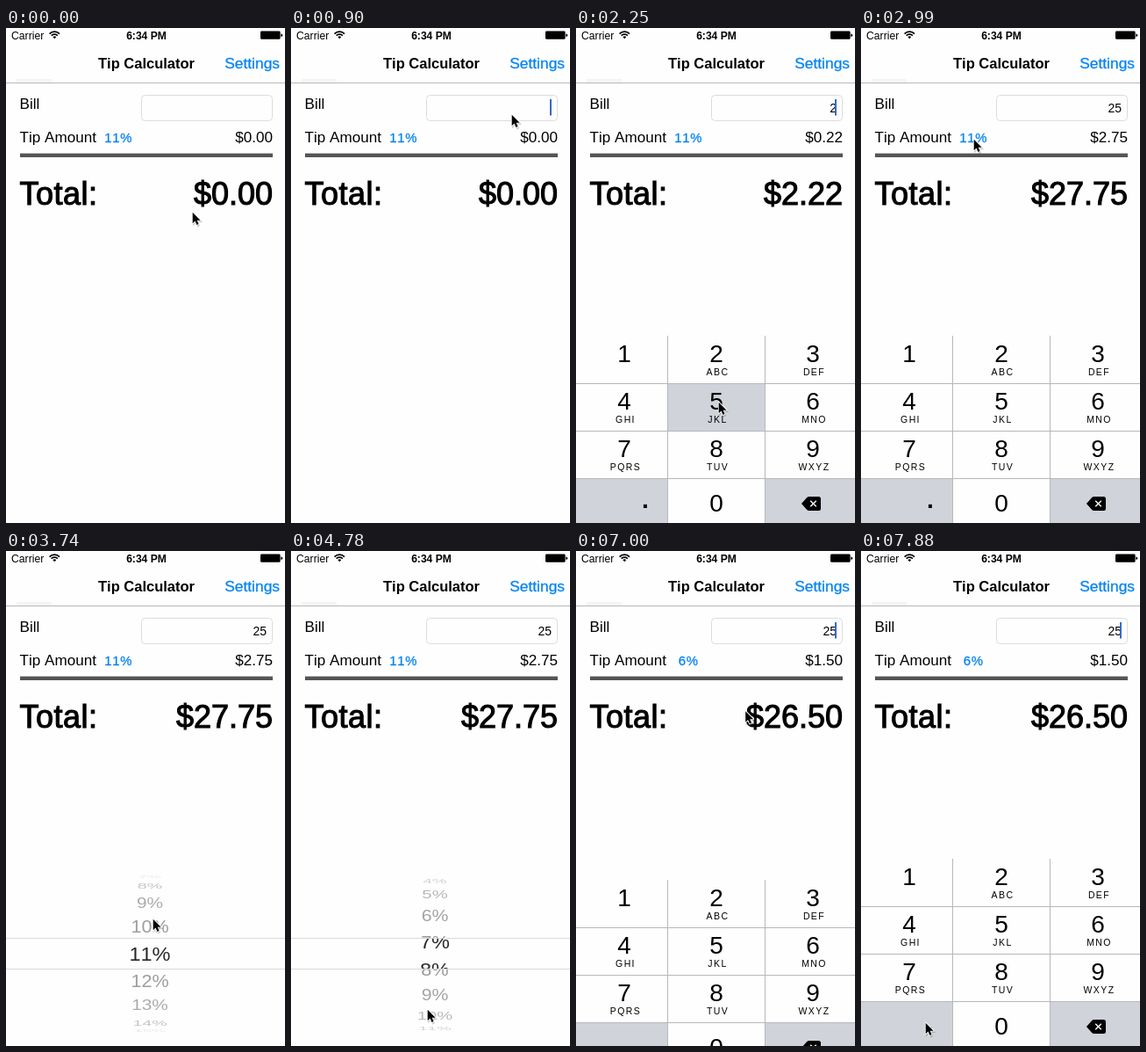
Animation of 318 by 563 pixels, one loop 8000 ms. Source, as an HTML page:

```html
<!DOCTYPE html>
<html lang="en">
<head>
<meta charset="utf-8">
<title>Tip Calculator</title>
<style>
  html, body { margin: 0; width: 100%; height: 100%; overflow: hidden; background: #fefefe; }
  svg { display: block; width: 100vw; height: 100vh; }
  text { font-family: "Liberation Sans", Arial, sans-serif; font-kerning: none; fill: #000; }
  .body { font-size: 17.1px; }
  .blue { fill: #0584f2; stroke: #0584f2; stroke-width: .3px; }
  .total { font-size: 36px; stroke: #000; stroke-width: 1.1px; }
  .bold { font-weight: bold; }
  .mid { text-anchor: middle; }
  .end { text-anchor: end; }
  .digit { font-size: 28px; }
  .abc { font-size: 10.5px; letter-spacing: 1.4px; }
  .row { font-size: 23.5px; }
</style>
</head>
<body>
<svg id="stage" viewBox="0 0 318 563" preserveAspectRatio="none">
  <defs>
    <clipPath id="lens"><rect x="0" y="441" width="318" height="34"/></clipPath>
    <clipPath id="rim"><path d="M0 340H318V440H0ZM0 476H318V563H0Z"/></clipPath>
    <path id="arrow" d="M0 0V14.6L3.3 11.5L5.6 16.7L8 15.6L5.8 10.5H10.4Z"/>
  </defs>
  <rect width="318" height="563" fill="#fefefe"/>

  <text x="6" y="12.5" font-size="12.2">Carrier</text>
  <g fill="none" stroke="#000" stroke-width="1.7">
    <path d="M49.6 6.6a8 8 0 0 1 11.4 0M51.7 8.7a5 5 0 0 1 7.2 0"/>
    <path d="M55.3 12.2L53.4 10.2a2.7 2.7 0 0 1 3.8 0Z" fill="#000" stroke="none"/>
  </g>
  <text class="bold mid" x="160" y="12.5" font-size="12.1">6:34 PM</text>
  <rect x="290" y="3.4" width="22.6" height="9.4" rx="1.4"/>
  <path d="M313.4 6.4a1.8 1.8 0 0 1 0 3.6Z"/>

  <text class="bold mid" x="160" y="46" font-size="16.5">Tip Calculator</text>
  <text class="blue end" x="312" y="46" font-size="17.4">Settings</text>
  <rect x="12" y="58" width="40" height="4" fill="#f4f4f4"/>
  <rect y="62" width="318" height="1" fill="#b9b9b9"/>

  <text class="body" x="15.5" y="92">Bill</text>
  <rect x="154.5" y="76.5" width="149" height="29" rx="4" fill="#fefefe" stroke="#dcdcdc"/>
  <text class="end" id="bill" x="297" y="95.5" font-size="14"></text>
  <rect id="caret" x="295" y="81" width="2" height="18.5" fill="#3467d6"/>
  <text class="body" x="15.5" y="130">Tip Amount</text>
  <text class="blue mid" id="pct" x="128.2" y="130" font-size="14.9" letter-spacing=".7"></text>
  <text class="body end" id="tip" x="304" y="130"></text>
  <rect x="16" y="142.6" width="288" height="4.4" fill="#555"/>
  <text class="total" x="15.5" y="200.6" style="font-kerning:normal" letter-spacing=".5">Total:</text>
  <text class="total end" id="total" x="304" y="200.6"></text>

  <g id="pad"></g>
  <g id="picker">
    <path d="M0 440.5H318M0 475.5H318" stroke="#dadada"/>
    <g id="outer" clip-path="url(#rim)"></g>
    <g id="inner" clip-path="url(#lens)"></g>
  </g>

  <g id="cursor">
    <use href="#arrow" x="1" y="1.8" opacity=".2" stroke="#000" stroke-width="1.5"/>
    <use href="#arrow" stroke="#fff" stroke-width="2" stroke-linejoin="round"/>
    <use href="#arrow"/>
  </g>
</svg>
<script>
const LOOP = 8000, STEP = 148.6;
const NS = "http://www.w3.org/2000/svg";
const $ = id => document.getElementById(id);

function add(parent, tag, attrs, text) {
  const el = document.createElementNS(NS, tag);
  for (const k in attrs) el.setAttribute(k, attrs[k]);
  if (text !== undefined) el.textContent = text;
  parent.appendChild(el);
  return el;
}

// Number pad
const pad = $("pad"), keys = {};
const edges = [0, 105, 216, 318], tops = [350, 405, 459, 513, 563];
const letters = ["", "ABC", "DEF", "GHI", "JKL", "MNO", "PQRS", "TUV", "WXYZ"];
const WHITE = "#fefefe", GRAY = "#d0d3da";

for (let i = 0; i < 12; i++) {
  const c = i % 3, r = Math.floor(i / 3);
  const side = r === 3 && c !== 1;
  const key = add(pad, "rect", {
    x: edges[c], y: tops[r], width: edges[c + 1] - edges[c],
    height: tops[r + 1] - tops[r], fill: side ? GRAY : WHITE
  });
  if (side) continue;
  const label = r === 3 ? 0 : i + 1;
  const x = [55, 160, 270][c];
  keys[label] = key;
  add(pad, "text", { class: "digit mid", x, y: 380 + 54 * r + (r === 3 ? 8 : 0) }, label);
  if (letters[i] && r < 3)
    add(pad, "text", { class: "abc mid", x: x + 1.5, y: 395 + 54 * r }, letters[i]);
}
add(pad, "path", {
  d: "M104.5 350V563M215.5 350V563M0 404.5H318M0 458.5H318M0 512.5H318",
  stroke: "#b6b8bc", fill: "none"
});
add(pad, "text", { class: "digit bold mid", x: 79, y: 546 }, ".");
add(pad, "path", { d: "M257 541L263 534.2Q264 533 266 533H276.5Q279 533 279 535.5V546.5Q279 549 276.5 549H266Q264 549 263 547.8Z" });
add(pad, "path", { d: "M267.2 537.7L273.8 544.3M273.8 537.7L267.2 544.3", stroke: "#fff", "stroke-width": 1.4 });

// Picker wheel
const rows = [];
for (let n = 0; n <= 20; n++) {
  const make = id => add($(id), "text", { class: "row mid", y: 8.2 }, n + "%");
  rows.push({ n, far: make("outer"), near: make("inner") });
}

function drawWheel(value) {
  for (const { n, far, near } of rows) {
    const a = (n - value) * 0.36, c = Math.cos(a);
    const show = Math.abs(a) < 1.52;
    far.style.display = near.style.display = show ? "" : "none";
    if (!show) continue;
    const y = 458.5 + 88 * Math.sin(a);
    const w = 0.93 - 0.18 * (1 - c);
    far.setAttribute("transform", `translate(164 ${y}) scale(${w} ${0.9 * c})`);
    far.setAttribute("fill-opacity", 0.4 * c ** 0.7);
    near.setAttribute("transform", `translate(164 ${y}) scale(1 ${0.96 * c})`);
    near.setAttribute("fill-opacity", 0.84);
  }
}

// Timeline, in steps
const path = [
  [0, 212, 209], [4, 251, 98], [6, 251, 98], [9, 182, 276], [12, 162, 378],
  [13, 162, 380], [15, 162, 425], [16, 162, 425], [20, 128, 126], [21, 128, 126],
  [25, 167, 418], [27.5, 166, 409], [32, 155, 521], [34, 152, 545], [36, 152, 545],
  [39, 141, 263], [41, 141, 263], [43, 190, 125], [44, 215, 93], [46, 215, 93],
  [48, 170, 270], [52, 73, 536]
];
const wheel = [[27.5, 11], [32, 7.45], [34, 6.6], [35, 6.1], [36, 6]];
const focusAt = 6, twoAt = 13, fiveAt = 16, pickAt = 21, pctAt = 36, hideAt = 39, refocusAt = 45;

function at(track, s, col = 1) {
  const i = track.findIndex(k => k[0] > s);
  if (i === 0) return track[0][col];
  if (i < 0) return track[track.length - 1][col];
  const a = track[i - 1], b = track[i];
  return a[col] + (b[col] - a[col]) * (s - a[0]) / (b[0] - a[0]);
}

const slide = (s, start) => {
  const x = Math.min(1, Math.max(0, (s - start) / 3));
  return 1 - (1 - x) ** 2;
};
const money = v => "$" + v.toFixed(2);

function place(el, open) {
  el.style.display = open > 0 ? "" : "none";
  el.setAttribute("transform", `translate(0 ${216 * (1 - open)})`);
}

function draw(ms) {
  const s = Math.floor(ms / STEP);
  const bill = s < twoAt ? "" : s < fiveAt ? "2" : "25";
  const pct = s < pctAt ? 11 : 6;
  const tip = bill * pct / 100;
  $("bill").textContent = bill;
  $("pct").textContent = pct + "%";
  $("tip").textContent = money(tip);
  $("total").textContent = money(+bill + tip);

  const editing = s >= focusAt && s < pickAt || s >= refocusAt;
  const since = [refocusAt, fiveAt, twoAt, focusAt].find(t => s >= t);
  $("caret").style.display = editing && (s - since) % 7 < 4 ? "" : "none";

  place(pad, editing ? slide(s, s < pickAt ? focusAt : refocusAt) : 0);
  place($("picker"), s >= pickAt ? 1 - slide(s, hideAt) : 0);
  keys[2].setAttribute("fill", s === twoAt - 1 ? GRAY : WHITE);
  keys[5].setAttribute("fill", s === fiveAt - 1 ? GRAY : WHITE);
  drawWheel(at(wheel, s));
  $("cursor").setAttribute("transform", `translate(${at(path, s) + 0.7} ${at(path, s, 2) + 0.7}) scale(.86)`);
}

const t0 = performance.now();
function tick() {
  draw((performance.now() - t0) % LOOP);
  requestAnimationFrame(tick);
}
tick();
</script>
</body>
</html>
```
